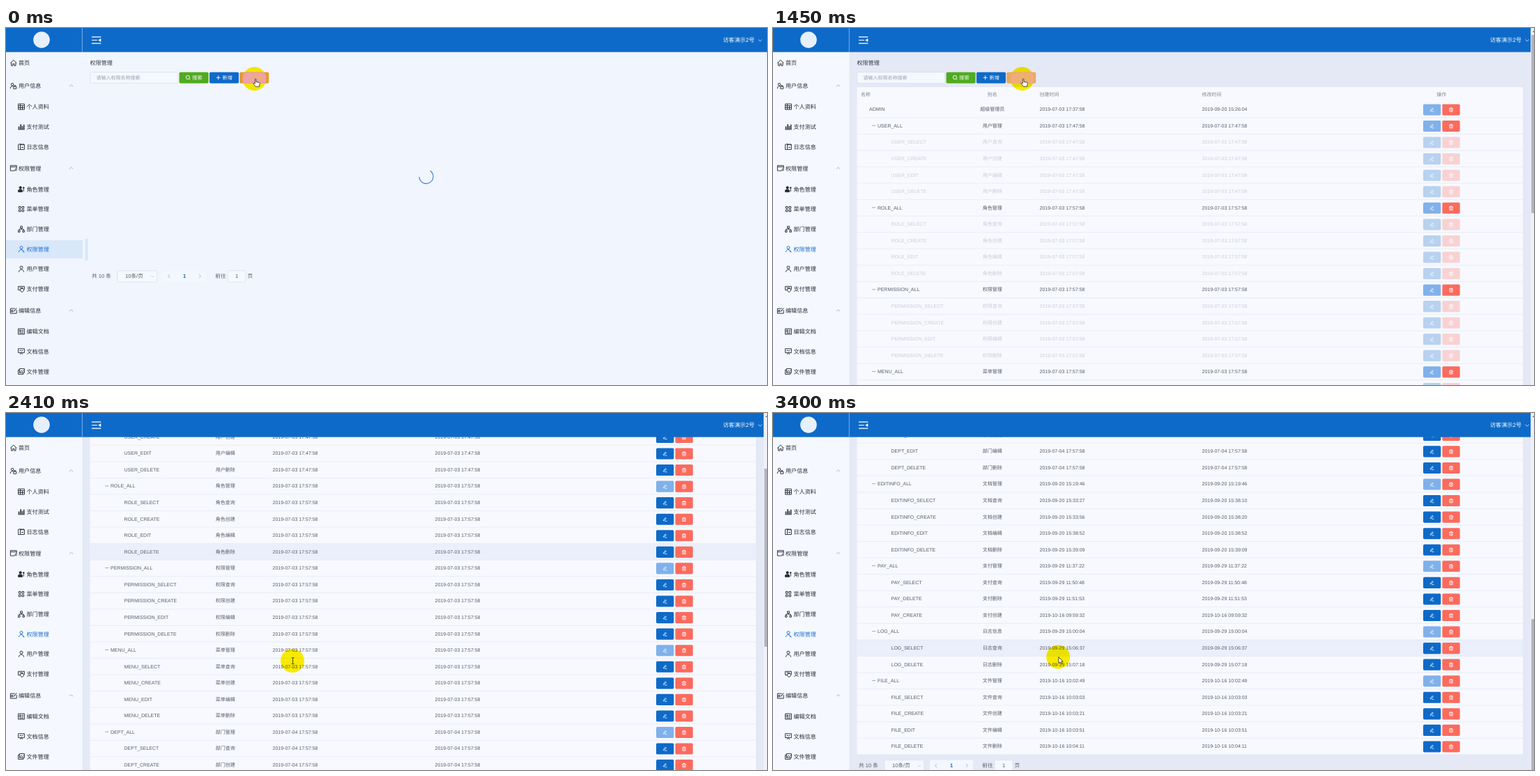
Write an HTML page that moves like this. It is 1092x513 px and loops after 3.5 s.

```html
<!DOCTYPE html>
<html>
<head>
<meta charset="utf-8">
<title>权限管理</title>
<style>
html, body { margin: 0; width: 100%; height: 100%; overflow: hidden; background: #f1f5fd; }
svg { display: block; width: 1092px; height: 513px; }
text {
  font-family: "Liberation Sans", "Noto Sans CJK SC", "Noto Sans CJK", sans-serif;
  text-rendering: geometricPrecision;
  white-space: pre;
}
</style>
</head>
<body>
<svg id="stage" viewBox="0 0 1092 513"></svg>
<script>
const LOOP = 3500;
const BLUE = '#0e6ac8', PALE_BLUE = '#80b1ea', RED = '#fb6b5e', INK = '#585d67', DARK = '#2a2e36';
const PITCH = 23.56, FIRST = 117, MAX_SCROLL = 627.5;

// ---------- drawing helpers ----------
const stage = document.getElementById('stage');

function add(parent, tag, attrs = {}, content) {
  const el = document.createElementNS('http://www.w3.org/2000/svg', tag);
  set(el, attrs);
  if (content !== undefined) el.textContent = content;
  parent.append(el);
  return el;
}
function set(el, attrs) {
  for (const key in attrs) el.setAttribute(key, attrs[key]);
}
const group = (p, attrs) => add(p, 'g', attrs);
const rect = (p, x, y, width, height, fill, more) =>
  add(p, 'rect', { x, y, width, height, fill, ...more });
const line = (p, d, stroke, width = 0.9, more) =>
  add(p, 'path', { d, stroke, 'stroke-width': width, fill: 'none', ...more });
// y is the middle of the text line
const label = (p, x, y, size, fill, str, more) =>
  add(p, 'text', { x, y: y + size * 0.36, 'font-size': size, fill, ...more }, str);
const centred = { 'text-anchor': 'middle' };
const bold = { 'font-weight': 500 };
const show = (el, on) => el.setAttribute('visibility', on ? 'visible' : 'hidden');

// ---------- table data ----------
const VERBS = { SELECT: '查询', CREATE: '创建', EDIT: '编辑', DELETE: '删除' };
const ALL = Object.keys(VERBS);
const same = time => ALL.map(verb => [verb, time]);
const noon = '07-03 17:57:58', deptTime = '07-04 17:57:58';
const GROUPS = [
  ['USER', '用户管理', '07-03 17:47:58', same('07-03 17:47:58')],
  ['ROLE', '角色管理', noon, same(noon)],
  ['PERMISSION', '权限管理', noon, same(noon)],
  ['MENU', '菜单管理', noon, same(noon)],
  ['DEPT', '部门管理', deptTime, same(deptTime)],
  ['EDITINFO', '文档管理', '09-20 15:19:46', [
    ['SELECT', '09-20 15:33:27', '09-20 15:38:10'], ['CREATE', '09-20 15:33:56', '09-20 15:38:20'],
    ['EDIT', '09-20 15:38:52'], ['DELETE', '09-20 15:39:09']]],
  ['PAY', '支付管理', '09-29 11:37:22', [
    ['SELECT', '09-29 11:50:48'], ['DELETE', '09-29 11:51:53'], ['CREATE', '10-16 09:59:32']]],
  ['LOG', '日志信息', '09-29 15:00:04', [
    ['SELECT', '09-29 15:06:37'], ['DELETE', '09-29 15:07:18']]],
  ['FILE', '文件管理', '10-16 10:02:49', [
    ['SELECT', '10-16 10:03:03'], ['CREATE', '10-16 10:03:21'],
    ['EDIT', '10-16 10:03:51'], ['DELETE', '10-16 10:04:11']]],
];

function listRows(open) {
  const rows = [{ level: 0, name: 'ADMIN', alias: '超级管理员', made: '07-03 17:37:58', edited: '09-20 15:26:04' }];
  for (const [key, alias, made, kids] of GROUPS) {
    rows.push({ level: 1, name: key + '_ALL', alias, made, edited: made });
    if (!open) continue;
    for (const [verb, from, to = from] of kids)
      rows.push({ level: 2, name: key + '_' + verb, alias: alias.slice(0, 2) + VERBS[verb], made: from, edited: to });
  }
  return rows;
}

function actionButton(p, x, y, fill, icon) {
  rect(p, x, y - 7.6, 25.3, 16.1, fill, { rx: 1.7 });
  line(p, icon, '#fff', 0.8, { transform: `translate(${x + 12.6} ${y + 0.5})` });
}
const PENCIL = 'M-2.2 1.2L0.6 -2.4L1.8 -1.4L-0.9 1.7L-2.4 1.9ZM-0.2 2.6H2.8';
const TRASH = 'M-2.9 -1.7H2.9M-1.1 -1.7V-2.7H1.1V-1.7M-2.1 -1.6V2.7H2.1V-1.6M-0.7 -0.3V1.5M0.7 -0.3V1.5';

// Builds one state of the table; child rows go in their own layer so they can fade.
function buildTable(parent, open) {
  const col = open ? { alias: 314.8, made: 382.5, edited: 615.5, act: 933 }
                   : { alias: 316, made: 385.5, edited: 620.5, act: 941.6 };
  const root = group(parent), rows = listRows(open);
  const bottom = FIRST + (rows.length - 0.5) * PITCH;
  let hover;
  if (open) {
    rect(root, 120.5, 85, 955.5, bottom - 85, '#f7f9fe');
    hover = rect(root, 120.5, 0, 955.5, PITCH, '#eaeffb');
  }
  const head = (x, str, more) => label(root, x, 95, 7, '#80858f', str, more);
  head(126, '名称');
  head(col.alias, '别名', centred);
  head(col.made, '创建时间');
  head(col.edited, '修改时间');
  head(col.act + 26.3, '操作', centred);
  const main = group(root), kids = group(root);
  rows.forEach((row, i) => {
    const y = FIRST + i * PITCH, p = row.level === 2 ? kids : main;
    const cell = (x, str, more) => label(p, x, y - 0.2, 7, INK, str, more);
    if (open) line(root, `M120.5 ${y + PITCH / 2}H1076`, '#e3e8f2', 0.7);
    if (row.level === 1)
      line(p, `M142 ${y - 0.4}h5.4` + (open ? '' : 'm-2.7 -2.7v5.4'), '#8798b2', 0.8);
    cell([138, 150, 169.5][row.level], row.name);
    cell(col.alias, row.alias, centred);
    cell(col.made, '2019-' + row.made);
    cell(col.edited, '2019-' + row.edited);
    actionButton(p, col.act, y, row.level === 2 ? BLUE : PALE_BLUE, PENCIL);
    actionButton(p, col.act + 27.4, y, RED, TRASH);
  });
  return { root, kids, hover, bottom };
}

// ---------- page ----------
const backdrop = rect(stage, 0, 0, 1092, 513, '#f1f5fd');
const page = group(stage);

label(page, 120.5, 50, 8.1, '#343a44', '权限管理');
const field = { stroke: '#d6dde9', 'stroke-width': 0.7, rx: 2 };
rect(page, 120.8, 63.5, 126, 15.8, '#f5f8fe', field);
label(page, 129.5, 71.3, 7, '#9aa1ae', '请输入权限名称搜索');

function toolButton(x, fill, str, icon) {
  rect(page, x, 63.4, 42, 16.2, fill, { rx: 1.8 });
  line(page, icon, '#fff', 0.9, { transform: `translate(${x + 12.6} 71.3)` });
  label(page, x + 18.6, 71.4, 7.2, '#fff', str, bold);
}
toolButton(248.6, '#4fab1f', '搜索', 'M-2.9 -0.4a2.6 2.6 0 1 0 5.2 0a2.6 2.6 0 1 0 -5.2 0M1.6 1.7L3.2 3.2');
toolButton(292, BLUE, '新增', 'M-3 0H3M0 -3V3');

const ICON_MINUS = 'M344.4 71.3h6', ICON_MORE = 'M344.3 71.3h1.4m1.1 0h1.4m1.1 0h1.4';
function foldButton(parent) {
  return {
    box: rect(parent, 335.2, 63.4, 42, 16.2, '#e8ae58', { rx: 1.8 }),
    icon: line(parent, ICON_MINUS, '#fff', 1),
    text: label(parent, 354, 71.4, 7.2, '#fff', '', bold),
  };
}
const fold = foldButton(page);

const closed = buildTable(page, false);
const opened = buildTable(page, true);
const spinner = line(page, 'M608.7 205.3A10 10 0 1 1 593 213.8', '#3c7ed0', 1.1);

const pager = group(page);
const pagerText = (x, str, fill = INK, more) => label(pager, x, 0, 7.6, fill, str, more);
pagerText(123, '共 10 条');
rect(pager, 159.8, -8, 57, 16.4, '#f5f8fe', field);
pagerText(171, '10条/页');
line(pager, 'M208 -0.6l2 2l2 -2', '#b3bac6', 0.7);
rect(pager, 225, -8, 62, 16.4, '#f4f7fd', { rx: 2 });
line(pager, 'M235 -2.5l-2.5 2.5l2.5 2.5M277 -2.5l2.5 2.5l-2.5 2.5', '#9aa3b3', 0.8);
pagerText(256, '1', BLUE, { ...centred, 'font-weight': 700 });
pagerText(300.3, '前往');
rect(pager, 318, -8, 26, 16.4, '#f5f8fe', field);
pagerText(331, '1', INK, centred);
pagerText(346.4, '页');

// ---------- pointer highlight ----------
const spot = add(stage, 'circle', { r: 17, fill: '#fff000', style: 'mix-blend-mode:multiply' });
const clip = add(add(add(stage, 'defs'), 'clipPath', { id: 'spot' }), 'circle', { r: 17 });
const tinted = foldButton(group(stage, { 'clip-path': 'url(#spot)' }));

// ---------- sidebar ----------
const side = rect(stage, 0, 34, 109.5, 479, '#f1f5fd');
const active = rect(stage, 0, 305, 110, 26, '#d9e7fa');
const tab = rect(stage, 113.5, 303, 4, 31, '#d9e7fa');
const PERSON = 'M3 3a2 2 0 1 0 4 0a2 2 0 1 0 -4 0M1.5 9.5C1.5 4.8 8.5 4.8 8.5 9.5';
// [y, text, icon path, kind]
const MENU = [
  [50.5, '首页', 'M0.5 5.2L5 1L9.5 5.2M1.8 4.3V9H4V6.3H6V9H8.2V4.3', 'top'],
  [83.5, '用户信息', 'M1.5 3a1.8 1.8 0 1 0 3.6 0a1.8 1.8 0 1 0 -3.6 0M0.6 9V7L3 5.5H4.6M5 6H9V9.2H5ZM6 6V4.6H8V6', 'fold'],
  [113.5, '个人资料', 'M0.6 1H9.4V9H0.6ZM0.6 3.6H9.4M0.6 6.3H9.4M3.5 1V9M6.5 3.6V9'],
  [142, '支付测试', 'M0.3 9.2H9.8M1.2 5.2H1.9V8.6H1.2ZM3.9 2H4.5V8.6H3.9ZM6.2 4.4H6.8V8.6H6.2ZM8.5 2.4H9V8.6H8.5Z', 'solid'],
  [171, '日志信息', 'M0.6 1.8L3.5 1V9L0.6 9.2ZM3.5 1.8H9.4V9H3.5M5 0.5V3M7.8 0.5V3M5 6H8'],
  [202, '权限管理', 'M7 8.5H0.6V1H9.4V5.5M0.6 3H9.4M7.2 7a1.2 1.2 0 1 0 2.4 0a1.2 1.2 0 1 0 -2.4 0', 'fold'],
  [232, '角色管理', 'M2 2.8a1.7 1.7 0 1 0 3.4 0a1.7 1.7 0 1 0 -3.4 0M0.6 9V6.4L2.6 5.4H4.8L6.4 6.4V9ZM8.3 4.5V8.4M7.4 3a0.9 0.9 0 1 0 1.8 0a0.9 0.9 0 1 0 -1.8 0', 'solid'],
  [260.5, '菜单管理', 'M1.4 1.4H4.1V4.1H1.4ZM6 1.4H8.7V4.1H6ZM1.4 6H4.1V8.7H1.4ZM6 6H8.7V8.7H6Z'],
  [289.5, '部门管理', 'M3.6 0.8H6.4V3.4H3.6ZM5 3.4V5M1.8 6.8V5H8.2V6.8M0.6 6.8H3V9.2H0.6ZM7 6.8H9.4V9.2H7Z'],
  [318, '权限管理', PERSON + 'M6.5 8L9.5 9.5', 'active'],
  [346.5, '用户管理', PERSON],
  [375.5, '支付管理', 'M0.6 1.2H9.4V5.5M0.6 1.2V6.5H3.5M2.5 3.2H7.5M6 4.2L8.8 5.2C8.8 8 7 9 6 9.4C4.5 8.6 3.4 7.5 3.4 5.2Z'],
  [406.5, '编辑信息', 'M0.6 2H7M0.6 2V9H9.4V4M2 4.5H4V6.8H2ZM5.6 6.6L9.4 1.2M5.6 4.4H6.6', 'fold'],
  [436.5, '编辑文档', 'M0.6 1H9.4V9H0.6ZM2.2 3H4.6V5.2H2.2ZM6 3.2H8M6 5H8M2.2 7.2H8'],
  [465, '文档信息', 'M0.6 1.2H9.4V7H0.6ZM3 9.4L5 7L7 9.4M2.5 4.5L4.2 3.4L5.6 4.8L7.6 3.2'],
  [494, '文件管理', 'M2.4 1H9.4V6.8H2.4ZM2.4 2.6H0.6V9H7.8V6.8M2.6 6.4L5 3.6L6.6 5.2L9 3'],
];
for (const [y, str, icon, kind] of MENU) {
  const ink = kind === 'active' ? '#1b70cf' : DARK;
  const heading = kind === 'top' || kind === 'fold';
  line(stage, icon, ink, 0.95, {
    transform: `translate(${heading ? 5.8 : 17} ${y - 5.4})`,
    fill: kind === 'solid' ? ink : 'none',
  });
  label(stage, heading ? 18 : 29.5, y, 8.1, ink, str);
  if (kind === 'fold') line(stage, `M91 ${y + 0.6}l2.6 -2.4l2.6 2.4`, '#8f98a8', 0.7);
}

// ---------- top bar ----------
rect(stage, 0, 0, 1092, 34.6, BLUE);
line(stage, 'M109.3 0V34.6', '#8ab8ea', 0.9);
add(stage, 'circle', { cx: 51, cy: 17, r: 11.8, fill: '#e6f0fc' });
line(stage, 'M123 12.9H136.3M123 17.5H131M123 22.1H136.3', '#fff', 1.1);
add(stage, 'path', { d: 'M136.3 15V20L132.2 17.5Z', fill: '#fff' });
label(stage, 1029, 17.4, 8.1, '#fff', '访客演示2号', bold);
line(stage, 'M1079.6 16.6l2.6 2.4l2.6 -2.4', '#e3eefb', 0.8);

const bar = group(stage);
rect(bar, 1087.2, 0, 4.8, 513, '#eef1f7');
add(bar, 'path', { d: 'M1089.4 6L1092 3.6V6Z', fill: '#7c818b' });
const thumb = rect(bar, 1088.2, 10, 3.8, 256, '#b1b4bd');

// ---------- cursors (drawn around their hot spot) ----------
const outline = { stroke: '#222', 'stroke-width': 0.8, 'stroke-linejoin': 'round', fill: '#fff' };
const cursors = {
  hand: add(stage, 'path', { ...outline, d: 'M1 0.3C1.6 -0.4 2.6 0 2.6 1V4.4L7 5.3C7.8 5.6 8 6 7.8 7L7 11.2H2L-1.6 7C-1.8 6 -0.6 5.6 0.9 7Z' }),
  arrow: add(stage, 'path', { ...outline, d: 'M0.6 0V9.2L2.7 7.4L4.1 10.4L5.6 9.7L4.2 6.8H7Z' }),
  beam: line(stage, 'M-1.4 -4.5H0.1L0.6 -4L1.1 -4.5H2.6M0.6 -4V4M-1.4 4.5H0.1L0.6 4L1.1 4.5H2.6', '#333', 0.9),
};

// ---------- timeline ----------
const TICKS = [0, 120, 220, 330, 430, 540, 750, 860, 980, 1090, 1210, 1330, 1450, 1580, 1690, 1790,
  1890, 1990, 2090, 2200, 2310, 2410, 2510, 2610, 2720, 2820, 2930, 3050, 3170, 3280, 3400];
const POINTER = [[0, 356.4, 73], [540, 357.3, 72.3], [1580, 357.5, 73], [1890, 387.2, 238.7],
  [2200, 411, 356], [2510, 411, 356], [2930, 410.2, 353.3], [3400, 409.2, 350.5]];
const SCROLL = [[2160, 0], [2410, 153.2], [2930, 474], [3180, MAX_SCROLL]];
const CURSOR = [[0, 'hand'], [1690, 'arrow'], [2310, 'beam'], [2720, 'arrow']];
const HOVER = [[0, -1], [2090, 10], [2720, 25], [3170, 36]];
// [time, icon, text, button, tinted button, tinted text]
const FOLD = [
  [0, ICON_MINUS, '折叠', '#e79a31', '#eea3a6', '#f2b944'],
  [220, ICON_MORE, '展开', '#c98b3b', '#d592a4', '#ffd83c'],
  [1330, ICON_MINUS, '折叠', '#e8a95f', '#efab7e', '#edbd45'],
  [1790, ICON_MINUS, '折叠', '#e8ae58', '#efab7e', '#edbd45'],
];

const at = (steps, t) => steps.filter(s => s[0] <= t).pop();
const clamp = v => Math.max(0, Math.min(1, v));

function mix(keys, t, k) {
  const i = keys.findIndex(key => key[0] > t);
  if (i === 0) return keys[0][k];
  if (i < 0) return keys[keys.length - 1][k];
  const a = keys[i - 1], b = keys[i];
  return a[k] + (b[k] - a[k]) * (t - a[0]) / (b[0] - a[0]);
}

function paintFold(b, icon, text, box, ink) {
  set(b.box, { fill: box });
  set(b.icon, { d: icon, stroke: ink });
  set(b.text, { fill: ink });
  b.text.textContent = text;
}

function draw(t) {
  const open = t >= 1330;
  const loaded = clamp((t - 170) / 220);
  const scroll = mix(SCROLL, t, 1);
  const x = mix(POINTER, t, 1), y = mix(POINTER, t, 2);

  set(backdrop, { fill: open ? '#e5e9f6' : '#f1f5fd' });
  set(side, { fill: open ? '#f5f8fe' : '#f1f5fd' });
  show(active, t < 330);
  show(tab, !open);
  show(bar, open);
  set(thumb, { y: 10 + scroll * 0.456 });

  set(page, { transform: `translate(0 ${-scroll})` });
  set(closed.root, { opacity: open ? 0 : loaded });
  set(opened.root, { opacity: open ? 1 : 0 });
  set(opened.kids, { opacity: clamp((t - 1325) / 465) });
  const row = at(HOVER, t)[1];
  set(opened.hover, { y: FIRST + (row - 0.5) * PITCH, opacity: row < 0 ? 0 : 1 });
  set(spinner, { opacity: 1 - loaded, transform: `rotate(${t * 0.18} 603 213.8)` });
  set(pager, { transform: `translate(0 ${(open ? opened : closed).bottom + 15.9})` });

  const [, icon, text, box, tint, ink] = at(FOLD, t);
  paintFold(fold, icon, text, box, '#fff');
  paintFold(tinted, icon, text, tint, ink);

  set(spot, { cx: x, cy: y });
  set(clip, { cx: x, cy: y });
  const kind = at(CURSOR, t)[1];
  for (const name in cursors) {
    show(cursors[name], name === kind);
    set(cursors[name], { transform: `translate(${x} ${y})` });
  }
}

let last = -1;
function loop() {
  const now = performance.now() % LOOP;
  const tick = TICKS.filter(v => v <= now).pop();
  if (tick !== last) draw(last = tick);
  requestAnimationFrame(loop);
}
loop();
</script>
</body>
</html>
```
